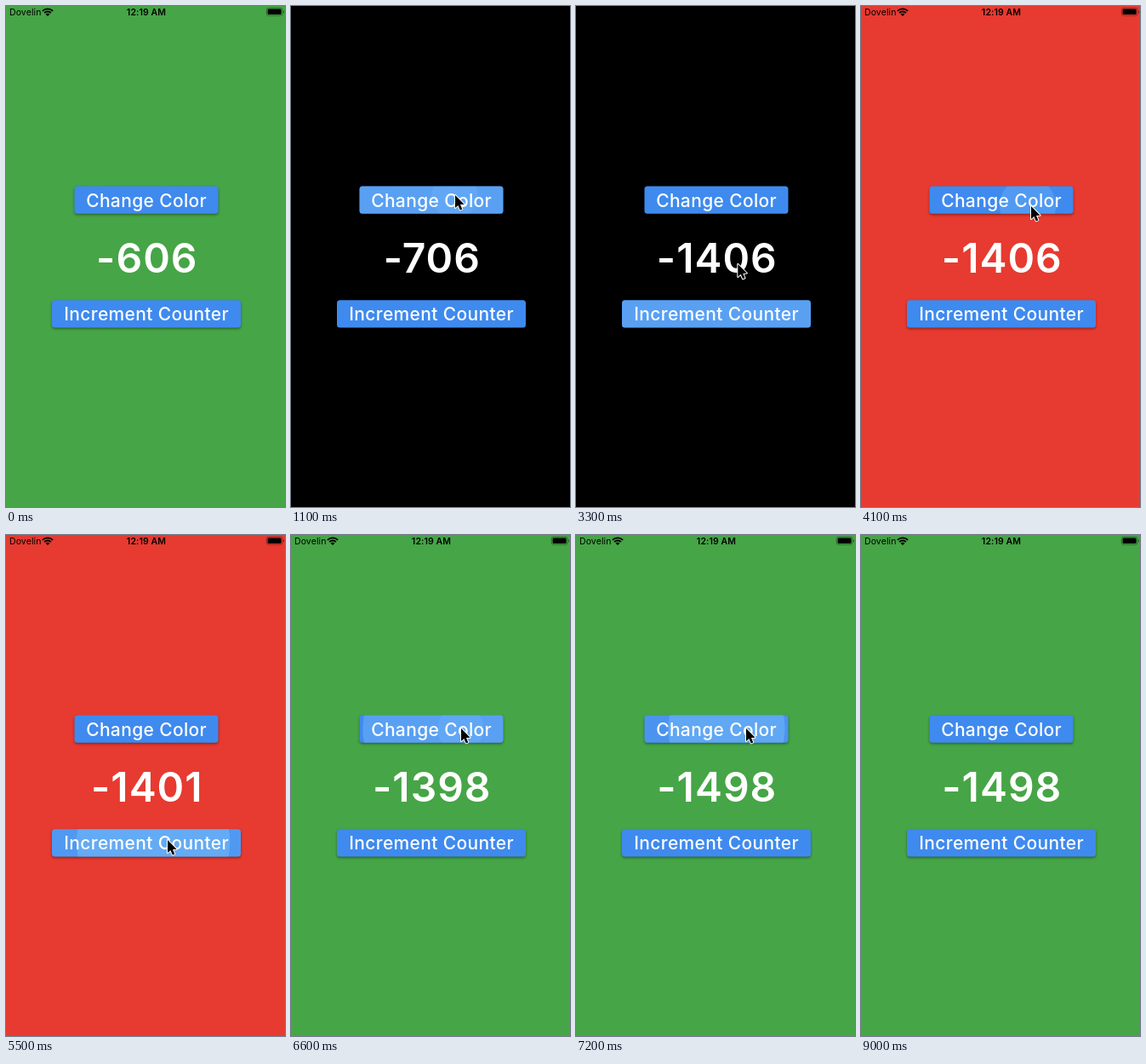
An HTML page with a canvas for the animation above (9.2 s loop, 328 by 588 pixels).

```html
<!DOCTYPE html>
<html lang="en">
<head>
<meta charset="utf-8">
<title>Counter demo</title>
<style>
html, body { margin: 0; width: 100%; height: 100%; overflow: hidden; background: #46a546; }
canvas { display: block; width: 328px; height: 588px; }
</style>
</head>
<body>
<canvas id="stage"></canvas>
<script>
const W = 328, H = 588, LOOP = 9200, STEP = 100;
const HOLD = 40; // time between press and release
const FONT = 'Inter, "Noto Sans", sans-serif';
const COLORS = { green: '#46a546', black: '#000', red: '#e73a30' };

const canvas = document.getElementById('stage');
const ctx = canvas.getContext('2d');
const dpr = window.devicePixelRatio || 1;
canvas.width = W * dpr;
canvas.height = H * dpr;

const change = { x: 80.5, y: 211.5, w: 169, h: 32.3, label: 'Change Color', base: 235.5 };
const increment = { x: 54, y: 345.3, w: 222, h: 32.2, label: 'Increment Counter', base: 368.8 };

// Cursor stops: time, x, y
const path = [
  [400, 336, 262], [760, 193, 222], [1300, 193, 222], [1600, 184, 347],
  [3150, 184, 347], [3500, 200, 235], [4250, 200, 235], [4560, 190, 358],
  [6080, 190, 358], [6350, 200, 227], [7400, 200, 227], [7950, 336, 190]
];

const tap = (button, time, color) => ({ button, time, color });
const series = (start, gap, n) =>
  Array.from({ length: n }, (_, i) => tap(increment, start + gap * i));

const taps = [
  tap(change, 860, 'black'), tap(change, 1065, 'black'),
  ...series(1731, 225, 7),
  tap(change, 4044, 'red'),
  ...series(4620, 190, 8),
  tap(change, 6430, 'green'), tap(change, 6565, 'black'),
  tap(change, 6850, 'red'), tap(change, 7083, 'green')
];

const clamp = v => Math.max(0, Math.min(1, v));
const mix = (a, b, k) => a + (b - a) * k;

// cubic-bezier(.25, .1, .25, 1)
function ease(x) {
  let lo = 0, hi = 1;
  const bez = (s, a, b) => 3 * a * s * (1 - s) ** 2 + 3 * b * s * s * (1 - s) + s ** 3;
  for (let i = 0; i < 20; i++) {
    const mid = (lo + hi) / 2;
    if (bez(mid, 0.25, 0.25) < x) lo = mid; else hi = mid;
  }
  return bez(lo, 0.1, 1);
}

function cursorAt(t) {
  const i = path.findIndex(p => p[0] > t);
  if (i < 1) return null;
  const [a, b] = [path[i - 1], path[i]];
  const s = (t - a[0]) / (b[0] - a[0]);
  const k = s * s * (3 - 2 * s);
  return { x: mix(a[1], b[1], k), y: mix(a[2], b[2], k) };
}

function stateAt(t) {
  let color = 'green', count = -606;
  for (const e of taps) {
    if (e.time + HOLD > t) break;
    if (!e.color) count += color === 'black' ? -100 : 1;
    else if (e.color !== color) {
      color = e.color;
      if (color === 'black') count -= 100;
    }
  }
  return { color, count };
}

function text(str, x, y, size, weight, fill, spacing = 0, align = 'center') {
  ctx.font = `${weight} ${size}px ${FONT}`;
  ctx.letterSpacing = spacing + 'px';
  ctx.textAlign = align;
  ctx.fillStyle = fill;
  ctx.fillText(str, x, y);
}

function box(x, y, w, h, r) {
  ctx.beginPath();
  ctx.roundRect(x, y, w, h, r);
}

function drawRipple(e, t) {
  const age = t - e.time;
  if (age < 0 || age > HOLD + 375) return;
  const b = e.button;
  const v = Math.min(age, HOLD) / 1000 + Math.max(0, age - HOLD) / 225;
  const k = ease(clamp(v));
  const full = Math.hypot(b.w, b.h) / 2;
  const from = cursorAt(e.time);
  const alpha = Math.min(clamp(age / 75), clamp((HOLD + 375 - age) / 150));
  ctx.fillStyle = `rgba(145,208,252,${0.31 * alpha})`;
  ctx.beginPath();
  ctx.arc(mix(from.x, b.x + b.w / 2, k), mix(from.y, b.y + b.h / 2, k),
    mix(full * 0.3, full + 5, k), 0, Math.PI * 2);
  ctx.fill();
}

function drawButton(b, t) {
  ctx.save();
  ctx.shadowColor = 'rgba(0,0,0,.4)';
  ctx.shadowBlur = 3 * dpr;
  ctx.shadowOffsetY = 1.5 * dpr;
  ctx.fillStyle = '#3f8aee';
  box(b.x, b.y, b.w, b.h, 3.5);
  ctx.fill();
  ctx.restore();

  ctx.save();
  box(b.x, b.y, b.w, b.h, 3.5);
  ctx.clip();
  taps.filter(e => e.button === b).forEach(e => drawRipple(e, t));
  ctx.restore();
  text(b.label, 165.1, b.base, 21, 500, '#fff', 0.35);
}

function drawStatus() {
  text('Dovelin', 4, 11, 10.5, 400, '#000', 0.1, 'left');
  text('12:19 AM', 165, 11, 10.5, 600, '#000', 0.1);

  // Wi-Fi fan
  ctx.save();
  ctx.beginPath();
  ctx.moveTo(49, 12);
  ctx.lineTo(40.5, 3.5);
  ctx.lineTo(40.5, 0);
  ctx.lineTo(57.5, 0);
  ctx.lineTo(57.5, 3.5);
  ctx.closePath();
  ctx.clip();
  ctx.strokeStyle = ctx.fillStyle = '#000';
  ctx.lineWidth = 1.9;
  for (const r of [5.5, 8.6]) {
    ctx.beginPath();
    ctx.arc(49, 12, r, Math.PI, 0);
    ctx.stroke();
  }
  ctx.beginPath();
  ctx.arc(49, 12, 3.3, Math.PI, 0);
  ctx.fill();
  ctx.restore();

  // Battery
  ctx.strokeStyle = ctx.fillStyle = 'rgba(0,0,0,.4)';
  ctx.lineWidth = 0.9;
  box(306.3, 2.3, 18.6, 9, 2.4);
  ctx.stroke();
  box(325.9, 5.3, 1.1, 3, 0.6);
  ctx.fill();
  ctx.fillStyle = '#000';
  box(307.6, 3.6, 16, 6.4, 1.3);
  ctx.fill();
}

function drawCursor(p) {
  const pts = [[0, 0], [0, 15], [3.4, 11.9], [5.8, 17.4], [8.3, 16.4], [6, 11], [10.6, 10.7]];
  ctx.save();
  ctx.translate(p.x, p.y);
  ctx.beginPath();
  pts.forEach(([x, y]) => ctx.lineTo(x, y));
  ctx.closePath();
  ctx.lineJoin = 'round';
  ctx.lineWidth = 2;
  ctx.strokeStyle = '#fff';
  ctx.stroke();
  ctx.fillStyle = '#000';
  ctx.fill();
  ctx.restore();
}

function draw(t) {
  const { color, count } = stateAt(t);
  ctx.setTransform(dpr, 0, 0, dpr, 0, 0);
  ctx.fillStyle = COLORS[color];
  ctx.fillRect(0, 0, W, H);
  drawStatus();
  drawButton(change, t);
  text(String(count), 165.8, 312.5, 48, 600, '#fff', 1);
  drawButton(increment, t);
  const p = cursorAt(t);
  if (p) drawCursor(p);
}

const start = performance.now();
function tick() {
  const t = (performance.now() - start) % LOOP;
  draw(Math.floor(t / STEP) * STEP);
  requestAnimationFrame(tick);
}
tick();
</script>
</body>
</html>
```
